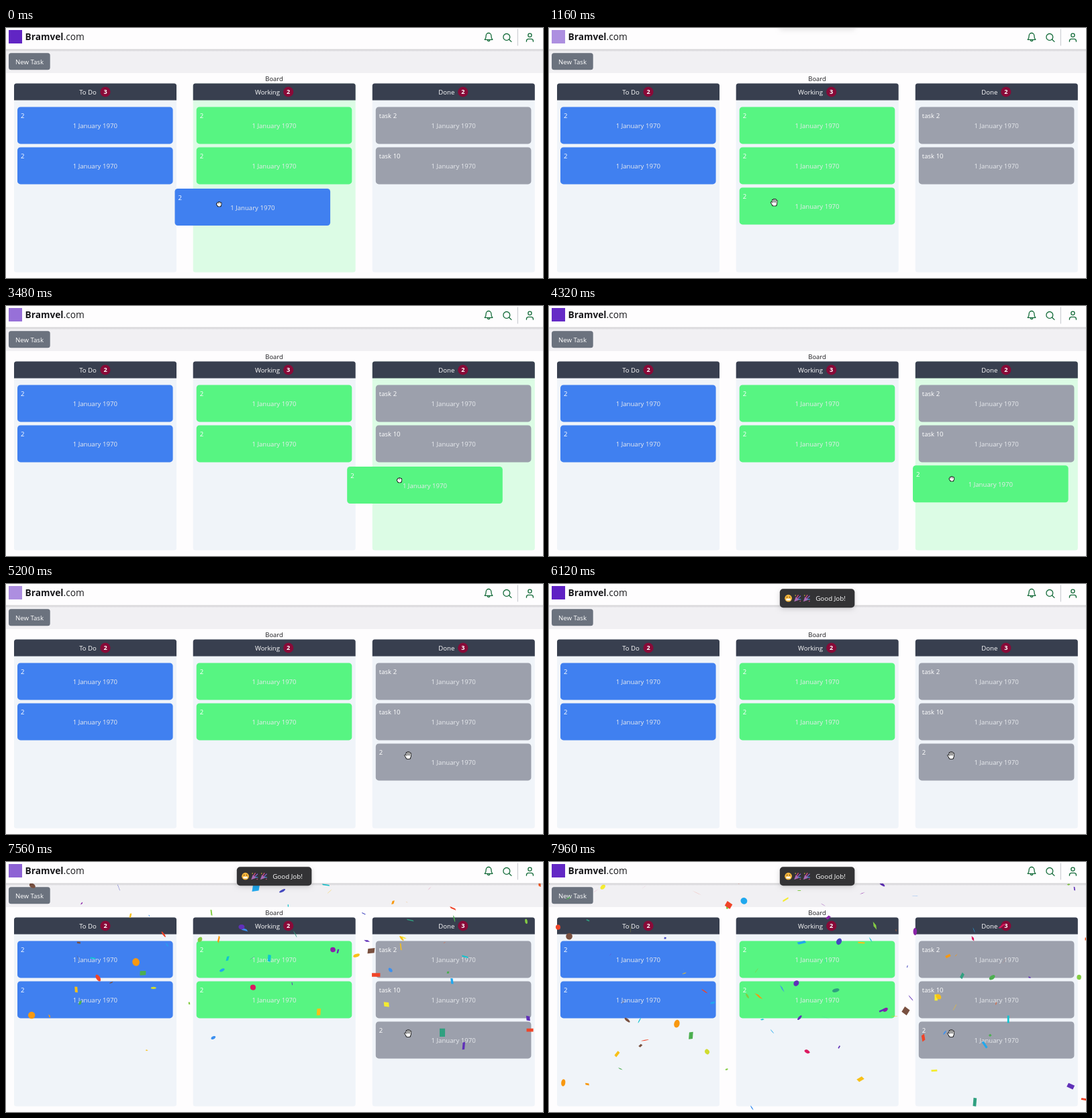
Recreate the animation shown at these times as an HTML page with a canvas. Size 800 px wide and 372 px high, loop 8 s.

```html
<!DOCTYPE html>
<html lang="en">
<head>
<meta charset="utf-8">
<title>Task board</title>
<style>
  html, body { margin: 0; width: 100%; height: 100%; overflow: hidden; background: #fefdfe; }
  canvas { display: block; width: 800px; height: 372px; }
</style>
</head>
<body>
<canvas id="stage"></canvas>
<script>
const W = 800, H = 372, LOOP = 8000;
const FONT = '"Open Sans", "Noto Sans", sans-serif';
const canvas = document.getElementById('stage');
const ctx = canvas.getContext('2d');
const dpr = window.devicePixelRatio || 1;
canvas.width = W * dpr;
canvas.height = H * dpr;

const BLUE = '#4080f0', GREEN = '#57f582', GREY = '#9ca0ac';
const CARD_W = 231.6, CARD_H = 55;
const COLS = [
  { x: 12, name: 'To Do', mid: 122, badge: 148, color: BLUE },
  { x: 278.7, name: 'Working', mid: 389.5, badge: 420.7, color: GREEN },
  { x: 545.8, name: 'Done', mid: 656.3, badge: 680.8, color: GREY }
];
const COL_W = 242;
const cardX = c => COLS[c].x + 5;
const cardY = i => 117.4 + 60 * i;

// Each drag: path of the card as [time, x, y], then a glide into its slot.
const DRAGS = [
  { from: 0, to: 1, grip: [66, 23], drop: 350,
    path: [[0, 251.5, 239], [300, 262, 240], [650, 269, 237.5]] },
  { from: 1, to: 2, grip: [78, 20], drop: 370,
    path: [[2580, 283.7, 237.4], [2840, 342, 240], [3220, 445, 239], [3650, 541, 239], [4050, 522, 237.5], [4200, 522, 237]] }
];
for (const d of DRAGS) {
  d.start = d.path[0][0];
  d.release = d.path[d.path.length - 1][0];
  d.end = d.release + d.drop;
}
const TOAST_DONE = 1115, TOAST_JOB = 5200, CONFETTI = 5600;

const clamp = v => Math.min(1, Math.max(0, v));
const mix = (a, b, p) => a + (b - a) * p;
const smooth = p => p * p * (3 - 2 * p);
const outCubic = p => 1 - (1 - p) ** 3;

function bezier(x1, y1, x2, y2) {
  const at = (a, b, s) => 3 * a * s * (1 - s) ** 2 + 3 * b * s * s * (1 - s) + s ** 3;
  return x => {
    let lo = 0, hi = 1;
    for (let i = 0; i < 22; i++) {
      const s = (lo + hi) / 2;
      if (at(x1, x2, s) < x) lo = s; else hi = s;
    }
    return at(y1, y2, lo);
  };
}
const pulseEase = bezier(.4, 0, .6, 1);
const enterEase = bezier(.21, 1.02, .73, 1);
const leaveEase = bezier(.06, .71, .55, 1);

function along(path, t) {
  for (let i = 1; i < path.length; i++) {
    const [t0, x0, y0] = path[i - 1], [t1, x1, y1] = path[i];
    if (t <= t1) {
      const p = smooth(clamp((t - t0) / (t1 - t0)));
      return [mix(x0, x1, p), mix(y0, y1, p)];
    }
  }
  return path[path.length - 1].slice(1);
}

function box(x, y, w, h, r, fill) {
  ctx.beginPath();
  ctx.roundRect(x, y, w, h, r);
  ctx.fillStyle = fill;
  ctx.fill();
}

function disc(x, y, r, fill) {
  ctx.beginPath();
  ctx.arc(x, y, r, 0, 7);
  ctx.fillStyle = fill;
  ctx.fill();
}

function text(str, x, y, color, align = 'left', size = 9.6, weight = 400) {
  ctx.font = `${weight} ${size}px ${FONT}`;
  ctx.textAlign = align;
  ctx.fillStyle = color;
  ctx.fillText(str, x, y);
}

function line(color, width, ...pts) {
  ctx.beginPath();
  pts.forEach(([x, y], i) => i ? ctx.lineTo(x, y) : ctx.moveTo(x, y));
  ctx.strokeStyle = color;
  ctx.lineWidth = width;
  ctx.stroke();
}

function card(x, y, color, title) {
  box(x, y, CARD_W, CARD_H, 4.5, color);
  text(title, x + 5, y + 16.5, '#fff');
  text('1 January 1970', x + CARD_W / 2, y + 31.8, '#e8eaee', 'center');
}

function boardState(t) {
  const [a, b] = DRAGS;
  const drag = DRAGS.find(d => t >= d.start && t < d.end);
  const counts = t < a.end ? [3, 2, 2] : t < b.end ? [2, 3, 2] : [2, 2, 3];
  const shown = counts.slice();
  if (!drag) return { counts, shown, over: -1 };
  shown[drag.from]--;
  let [x, y] = along(drag.path, t);
  const grip = [x + drag.grip[0], y + drag.grip[1]];
  const mid = x + CARD_W / 2;
  const over = COLS.findIndex(c => mid > c.x && mid < c.x + COL_W);
  if (t > drag.release) {
    const p = outCubic((t - drag.release) / drag.drop);
    x = mix(x, cardX(drag.to), p);
    y = mix(y, cardY(2), p);
  }
  return { counts, shown, over, drag, x, y, grip };
}

function drawBoard(s) {
  text('Board', 399.5, 78.8, '#18181b', 'center', 9.4);
  COLS.forEach((c, i) => {
    box(c.x, 82.4, COL_W, 281.2, 3.5, i === s.over ? '#dcfce5' : '#f0f4f9');
    box(c.x, 82.4, COL_W, 25, [3.5, 3.5, 0, 0], '#383f4f');
    text(c.name, c.mid, 98.9, '#fff', 'center');
    disc(c.badge, 95, 7.6, '#880a38');
    text(s.counts[i], c.badge, 98.4, '#fff', 'center', 9.2, 700);
    for (let k = 0; k < s.shown[i]; k++) {
      const title = i === 2 && k < 2 ? ['task 2', 'task 10'][k] : '2';
      card(cardX(i), cardY(k), c.color, title);
    }
  });
  if (s.drag) card(s.x, s.y, COLS[s.drag.from].color, '2');
}

function drawToolbar() {
  ctx.fillStyle = '#f1f0f3';
  ctx.fillRect(0, 32, W, 35);
  box(4, 37.3, 61.7, 25, 3.5, '#6b727e');
  text('New Task', 35, 53.5, '#fff', 'center');
}

function drawHeader(t) {
  const shade = ctx.createLinearGradient(0, 31, 0, 35.5);
  shade.addColorStop(0, 'rgba(0,0,0,.16)');
  shade.addColorStop(1, 'rgba(0,0,0,0)');
  ctx.fillStyle = shade;
  ctx.fillRect(0, 31, W, 5);
  ctx.fillStyle = '#fefdfe';
  ctx.fillRect(0, 0, W, 31.4);

  const phase = ((t + 1880) % 2000) / 1000;
  ctx.globalAlpha = 1 - .5 * pulseEase(phase < 1 ? phase : 2 - phase);
  ctx.fillStyle = '#5f22c4';
  ctx.fillRect(4, 3, 20, 20);
  ctx.globalAlpha = 1;

  const name = 'Bramvel';
  text(name, 28.6, 18.2, '#18181b', 'left', 13.7, 700);
  text('.com', 28.6 + ctx.measureText(name).width, 18.2, '#18181b', 'left', 13.7);

  const ink = '#126a38';
  ctx.lineCap = ctx.lineJoin = 'round';
  ctx.strokeStyle = ink;
  ctx.lineWidth = 1.3;
  ctx.stroke(new Path2D('M713.2 17.3c1.8-1.8 2-3.8 2-6a3.8 3.8 0 0 1 7.6 0c0 2.2.2 4.2 2 6zM717.2 17.6a1.9 2.6 0 0 0 3.7 0'));
  ctx.beginPath();
  ctx.arc(745.8, 13.4, 4.9, 0, 7);
  ctx.stroke();
  line(ink, 1.3, [749.4, 17], [752.9, 20.4]);
  ctx.stroke(new Path2D('M783 10.7a2.6 2.6 0 1 1-5.2 0a2.6 2.6 0 1 1 5.2 0M775.4 20.2v-.8a3 3 0 0 1 3-3h4a3 3 0 0 1 3 3v.8'));
  line('#c4c6cb', 1, [762.3, 2], [762.3, 26]);
}

function toast(age, life, width, color, body) {
  if (age < 0 || age > life + 400) return;
  let shift, scale, alpha;
  if (age < life) {
    const p = enterEase(clamp(age / 350));
    [shift, scale, alpha] = [-2 * (1 - p), mix(.6, 1, p), mix(.5, 1, p)];
  } else {
    const p = leaveEase(clamp((age - life) / 400));
    [shift, scale, alpha] = [-1.5 * p, mix(1, .6, p), 1 - p];
  }
  ctx.save();
  ctx.globalAlpha = alpha;
  ctx.translate(399.6, 21.2 + shift * 28);
  ctx.scale(scale, scale);
  ctx.shadowColor = 'rgba(0,0,0,.16)';
  ctx.shadowBlur = 7 * dpr;
  ctx.shadowOffsetY = 2 * dpr;
  box(-width / 2, -14, width, 28, 5, color);
  ctx.shadowColor = 'transparent';
  body(age);
  ctx.restore();
}

function movedBody(age) {
  const grow = outCubic(clamp((age - 100) / 300));
  if (grow > 0) disc(-59.5, 0, 6.2 * grow, '#61d345');
  if (age > 300) {
    const p = clamp((age - 300) / 200);
    const short = clamp(p / .4), long = clamp((p - .4) / .6);
    const pts = [[-62.2, .2], [mix(-62.2, -60.3, short), mix(.2, 2.3, short)]];
    if (long > 0) pts.push([mix(-60.3, -56.8, long), mix(2.3, -2.6, long)]);
    line('#fff', 1.3, ...pts);
  }
  text('Item moved successfully', -47.5, 3.7, '#3b3b3f');
}

function popper(x) {
  ctx.beginPath();
  ctx.moveTo(x - 5, 5);
  ctx.lineTo(x - 2.4, -2.2);
  ctx.lineTo(x + 2.2, 2.6);
  ctx.fillStyle = '#a86bb4';
  ctx.fill();
  line('#e2498a', 1.2, [x - 1, -1], [x + 1, -4.6]);
  line('#8a62dc', 1.2, [x + .6, .4], [x + 4.4, -3.2]);
  line('#4f9ee8', 1.1, [x + 1.6, 1.4], [x + 4.8, 1.8]);
  disc(x - 3, -4.2, .8, '#f3c63a');
  disc(x + 4, 4.4, .8, '#e2498a');
}

function jobBody() {
  disc(-43, 0, 5.4, '#f5b63c');
  disc(-45, -1.6, .8, '#5b3a1c');
  disc(-41, -1.6, .8, '#5b3a1c');
  box(-46.2, .6, 6.4, 2.8, 1.2, '#fff');
  popper(-29.4);
  popper(-15.8);
  text('Good Job!', -2.4, 3.7, '#fff', 'left', 9.8);
}

function random(seed) {
  return (lo = 0, hi = 1) => {
    seed = (seed + 0x6D2B79F5) | 0;
    let r = Math.imul(seed ^ seed >>> 15, 1 | seed);
    r = r + Math.imul(r ^ r >>> 7, 61 | r) ^ r;
    return lo + (hi - lo) * ((r ^ r >>> 14) >>> 0) / 4294967296;
  };
}

const PAPER = ['#f04428', '#dc1a60', '#8a22a8', '#6030b8', '#4448c0', '#3c90f0', '#20a8ee', '#10c4d0',
  '#30a080', '#4caf50', '#84cc44', '#d0dc30', '#f4ec30', '#f8c018', '#f89810', '#f45820', '#795040'];
const PAGE = 0.627;
const rnd = random(41);
const pieces = Array.from({ length: 145 }, (_, i) => ({
  born: CONFETTI + 500 * i / 145,
  x: rnd(0, W / PAGE), vx: rnd(-4, 4), vy: rnd(-10, 0),
  w: rnd(5, 20), h: rnd(5, 20), r: rnd(5, 10),
  shape: Math.floor(rnd(0, 3)), color: PAPER[Math.floor(rnd(0, PAPER.length))],
  angle: rnd(0, 2 * Math.PI), spin: rnd(-.2, .2), flip: rnd()
}));

// Gravity .1 and friction .99 per tick of 1/60 s, in closed form.
function drawConfetti(t) {
  if (t < CONFETTI) return;
  ctx.save();
  ctx.beginPath();
  ctx.rect(0, 32, W, H);
  ctx.clip();
  ctx.scale(PAGE, PAGE);
  for (const p of pieces) {
    const n = (t - p.born) * .06;
    if (n < 0) continue;
    const glide = (1 - .99 ** n) / .01;
    const turn = p.angle + p.spin * n;
    const wave = (p.flip + 1 + n * .1) % 4;
    ctx.save();
    ctx.translate(p.x + p.vx * glide, p.vy * glide + 9.9 * (n - glide));
    ctx.rotate(turn);
    ctx.scale(1, wave < 2 ? wave - 1 : 3 - wave);
    ctx.rotate(turn);
    if (p.shape === 0) {
      disc(0, 0, p.r, p.color);
    } else {
      const w = p.shape === 1 ? p.w : p.w / 3;
      ctx.fillStyle = p.color;
      ctx.fillRect(-w / 2, -p.h / 2, w, p.h);
    }
    ctx.restore();
  }
  ctx.restore();
}

function hand(x, y, open) {
  const fingers = open
    ? [[-2.2, -3.2], [-.2, -4.4], [1.9, -4], [3.8, -2.4]]
    : [[-2, -1.6], [-.4, -2.2], [1.2, -2], [2.6, -1.2]];
  const size = open ? 1 : .7;
  ctx.save();
  ctx.translate(x, y);
  ctx.lineCap = ctx.lineJoin = 'round';
  for (const [color, width, grow] of [['#111', 2.9, .8], ['#fff', 1.3, 0]]) {
    for (const [fx, fy] of fingers) line(color, width, [fx, fy], [fx * .85, 1.5]);
    line(color, width, [-4.3 * size, .2], [-2 * size, 3 * size]);
    box(-2.8 * size - grow, -grow, 6.2 * size + 2 * grow, 5 * size + 2 * grow, 2 * size, color);
  }
  if (open) {
    for (const fx of [-1.2, .8, 2.8]) line('#555', .45, [fx, -2.6], [fx, .4]);
  }
  ctx.restore();
}

function drawCursor(t, s) {
  if (s.drag) return hand(...s.grip, false);
  if (t < DRAGS[1].start) {
    const p = smooth(clamp((t - 1750) / 700));
    return hand(mix(335.5, 361, p), mix(259.5, 257, p), true);
  }
  hand(599, 255, true);
}

function draw(t) {
  ctx.setTransform(dpr, 0, 0, dpr, 0, 0);
  ctx.fillStyle = '#fefdfe';
  ctx.fillRect(0, 0, W, H);
  const s = boardState(t);
  drawToolbar();
  drawBoard(s);
  drawConfetti(t);
  drawHeader(t);
  toast(t - TOAST_DONE, 2000, 145, '#fff', movedBody);
  toast(t - TOAST_JOB, 4000, 111.5, '#333335', jobBody);
  drawCursor(t, s);
}

const began = performance.now();
function tick() {
  draw((performance.now() - began) % LOOP);
  requestAnimationFrame(tick);
}
tick();
</script>
</body>
</html>
```
